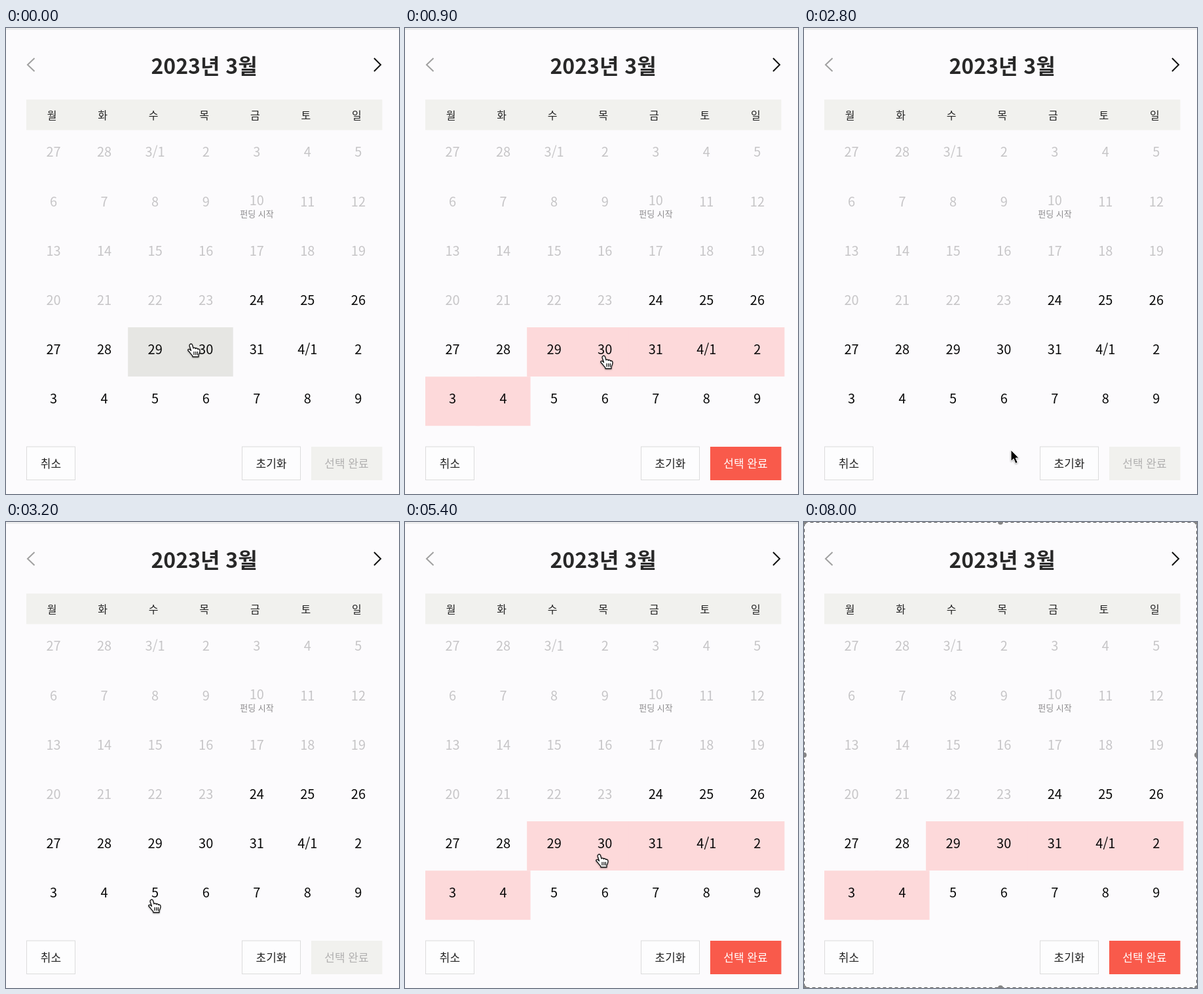
An HTML page that plays this animation: 600x710 px, repeating every 8.2 s.

```html
<!DOCTYPE html>
<html lang="ko">
<head>
<meta charset="utf-8">
<style>
  html, body { margin: 0; width: 100%; height: 100%; overflow: hidden; background: #fcfbfd; }
  svg { display: block; }
  text { font-family: "Noto Sans CJK KR", "Noto Sans CJK", sans-serif; font-weight: 500;
    text-anchor: middle; -webkit-text-stroke: .3px; }
</style>
</head>
<body>
<svg id="stage" width="600" height="710" viewBox="0 0 600 710">
  <rect id="topBar" width="600" height="3" fill="#ededee"/>
  <g fill="none" stroke-width="2">
    <path d="M43.5 46L33 56L43.5 66" stroke="#a0a0a0"/>
    <path d="M562 46L572 56L562 66" stroke="#111"/>
  </g>
  <text x="302.5" y="69.5" font-size="32" fill="#282828" style="font-weight:700;-webkit-text-stroke:0">2023년 3월</text>
  <rect x="31" y="109" width="543.5" height="46.5" fill="#f1f1ee"/>
  <g id="fills"></g>
  <g id="labels"></g>
  <g fill="#fdfdfe" stroke="#dcdcdc">
    <rect x="31.5" y="638" width="74" height="50.5"/>
    <rect x="360.5" y="638" width="89" height="50.5"/>
  </g>
  <rect id="done" x="466" y="638" width="108.5" height="51"/>
  <g font-size="17" fill="#222">
    <text x="68.5" y="670">취소</text>
    <text x="405" y="670">초기화</text>
    <text id="doneText" x="520" y="670">선택 완료</text>
  </g>
  <g id="cursor" style="filter:drop-shadow(0 1px 1px #0005)">
    <g id="hand" fill="#fff" stroke="#111" stroke-width="1.3" stroke-linejoin="round" stroke-linecap="round">
      <path d="M-6-9C-4.5-10.5-3-9.5-2.5-8L-1-3C0-4.5 2-4 2.3-2.5C3.3-3.8 5.3-3.2 5.6-1.6C7-2.6 9-1.5 9 .8C9 4 8 5 7 7V10H-2L-2.5 8C-5 5.5-6 3.5-9 .5C-10-1-8-2.5-6-1L-4.5 .5L-6.8-6.5C-7.1-7.8-7-8.5-6-9Z"/>
      <path d="M0 2.5V6.8M2.8 2.5V6.8M5.4 2.5V6.8"/>
    </g>
    <path id="arrow" transform="translate(-5 -10)" fill="#000" stroke="#fff"
      d="M0 0V17L4 13.4L7 20.5L10.2 19.1L7.2 12.2H12Z"/>
  </g>
  <g id="outline" fill="#858585">
    <rect x=".5" y=".5" width="599" height="709" fill="none" stroke="#555" stroke-dasharray="5 4"/>
  </g>
</svg>
<script>
const $ = id => document.getElementById(id);
const LOOP = 8200, COL = 543 / 7, ROW = 75.2;
const PINK = '#fdd9da', LIGHT = '#fbe8e5', PALE = '#fdf6f3', GREY = '#e6e6e3';

function add(parent, tag, attrs, content = '') {
  const el = document.createElementNS('http://www.w3.org/2000/svg', tag);
  for (const key in attrs) el.setAttribute(key, attrs[key]);
  el.textContent = content;
  return parent.appendChild(el);
}

function dayLabel(i) {
  if (i < 2) return 27 + i;
  if (i === 2) return '3/1';
  if (i === 33) return '4/1';
  return i < 33 ? i - 1 : i - 32;
}

[...'월화수목금토일'].forEach((name, c) =>
  add($('labels'), 'text', { x: 70 + COL * c, y: 138.5, 'font-size': 16, fill: '#222' }, name));

const cells = Array.from({ length: 42 }, (_, i) => {
  const c = i % 7, r = Math.floor(i / 7);
  const hasNote = i === 11;
  add($('labels'), 'text', {
    x: 72.5 + COL * c, y: 196.3 + ROW * r - (hasNote ? 2 : 0),
    'font-size': 20, fill: i < 25 ? '#c6c5c7' : '#080808'
  }, dayLabel(i));
  return add($('fills'), 'rect', { x: 31 + COL * c, y: 155.2 + ROW * r, width: 83, height: 75 });
});
add($('labels'), 'text', { x: 383, y: 288, 'font-size': 13, fill: '#8c8b8d',
  style: 'font-weight:400;-webkit-text-stroke:0' }, '펀딩 시작');

for (const x of [0, 300, 600])
  for (const y of [0, 355, 710])
    if (x !== 300 || y !== 355) add($('outline'), 'circle', { cx: x, cy: y, r: 4 });

// Each step: start time, then [first cell, last cell, colour] spans
const steps = [
  [0, [30, 31, GREY]],
  [600, [30, 36, PINK]],
  [1900, [28, 29, LIGHT], [30, 34, PINK], [35, 36, PALE]],
  [2000, [28, 34, PINK]],
  [2700],
  [3600, [35, 41, PINK]],
  [4200, [32, 34, LIGHT], [35, 38, PINK]],
  [4300, [32, 34, LIGHT], [35, 36, PINK], [37, 38, PALE]],
  [4500, [30, 31, LIGHT], [32, 36, PINK], [37, 38, PALE]],
  [4600, [30, 36, PINK], [37, 38, PALE]],
  [4800, [30, 36, PINK]]
];

// Pointer keys: time, x, y
const pointer = [
  [0, 287, 491], [500, 308, 509], [900, 308, 509], [1700, 292, 512], [1900, 152, 519],
  [2000, 152, 519], [2600, 405, 662], [2800, 321, 653], [3200, 227, 585], [3500, 227, 585],
  [4300, 388, 521], [4800, 388, 521], [5400, 301, 516], [LOOP, 301, 516]
];

function pointerAt(t) {
  const n = pointer.findIndex(key => key[0] > t);
  const [t0, x0, y0] = pointer[n - 1], [t1, x1, y1] = pointer[n];
  const p = (t - t0) / (t1 - t0), e = p * p * (3 - 2 * p);
  return [x0 + (x1 - x0) * e, y0 + (y1 - y0) * e];
}

const show = (id, visible) => { $(id).style.display = visible ? '' : 'none'; };
const within = (t, from, to) => t >= from && t < to;

function draw(now) {
  const t = Math.floor(now % LOOP / 100) * 100;
  const spans = steps.filter(step => step[0] <= t).pop().slice(1);
  cells.forEach((cell, i) => {
    const span = spans.find(([first, last]) => i >= first && i <= last);
    cell.setAttribute('fill', span ? span[2] : 'none');
  });

  const ready = within(t, 900, 2700) || t >= 3600;
  $('done').setAttribute('fill', ready ? '#f95a4b' : '#f1f1ee');
  $('doneText').setAttribute('fill', ready ? '#fff' : '#b1b0b0');

  $('cursor').setAttribute('transform', `translate(${pointerAt(t)})`);
  const overGap = within(t, 2700, 3100);
  show('cursor', t < 6000);
  show('hand', !overGap);
  show('arrow', overGap);
  show('outline', t >= 6800);
  show('topBar', t < 6800);
}

const start = performance.now();
function tick() {
  draw(performance.now() - start);
  requestAnimationFrame(tick);
}
tick();
</script>
</body>
</html>
```
